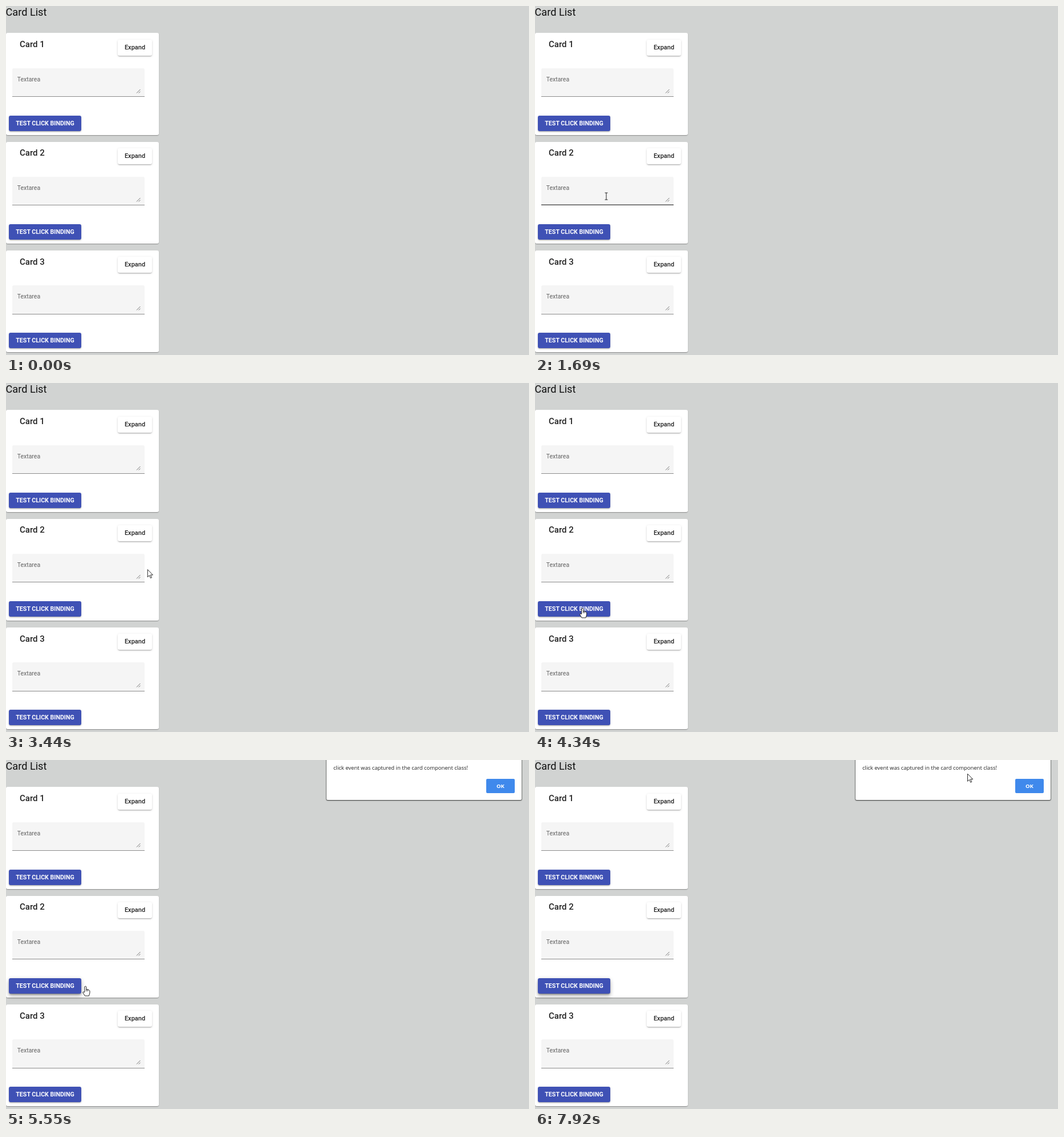
Recreate the animation shown at these times as an HTML page. Size 917 by 611 pixels, loop 7990 ms.

```html
<!DOCTYPE html>
<html lang="en">
<head>
<meta charset="utf-8">
<title>Card List</title>
<style>
  html, body { margin: 0; width: 100%; height: 100%; overflow: hidden; }
  body { position: relative; background: #d1d3d2; font-family: Roboto, sans-serif; color: rgba(0,0,0,.87); }
  body *, svg { position: absolute; white-space: nowrap; box-sizing: border-box; }
  h1, h2 { margin: 0; }
  h1 { left: -.6px; top: 0; font: 400 18.2px/21px Roboto, sans-serif; color: #111; }
  .card { left: 0; width: 268px; height: 178.3px; background: #fff; border-radius: 3px;
    box-shadow: 0 1.5px 1px -1px rgba(0,0,0,.2), 0 1px 1px rgba(0,0,0,.14), 0 1px 2px rgba(0,0,0,.12); }
  h2 { left: 24px; top: 9.95px; font: 500 15px/20px Roboto, sans-serif; }
  .button { border-radius: 3px; text-align: center;
    box-shadow: 0 2px 1px -1.5px rgba(0,0,0,.2), 0 1.5px 1.5px rgba(0,0,0,.14), 0 1px 4px rgba(0,0,0,.12); }
  .expand { left: 196px; top: 11.7px; width: 60px; height: 28px; font: 500 11px/27px Roboto, sans-serif; }
  .test { left: 5px; top: 144.4px; width: 127px; height: 27px; background: #3f51b5; color: #fff;
    font: 700 10.65px/27px Roboto, sans-serif; }
  .test span { left: 0; right: 0; }
  .lift { inset: 0; border-radius: 3px; opacity: 0;
    box-shadow: 0 4px 4px -2px rgba(0,0,0,.2), 0 6px 7px 1px rgba(0,0,0,.14), 0 2px 10px 1px rgba(0,0,0,.12); }
  .clip { inset: 0; border-radius: 3px; overflow: hidden; }
  .ripple { left: 78px; top: 13px; border-radius: 50%; background: #fff; opacity: 0; transform: translate(-50%, -50%); }
  .field { left: 11.4px; top: 61.5px; width: 232px; height: 50.4px; background: #f5f5f5;
    border-radius: 3px 3px 0 0; font-size: 10.5px; line-height: 20px; color: rgba(0,0,0,.6); }
  .field span { left: 8.3px; top: 9.8px; }
  .field svg { left: 217px; top: 35px; }
  .line, .hover { left: 0; right: 0; bottom: 0; height: 1px; background: #8c8c8c; }
  .hover { height: 2px; background: #222; opacity: 0; }
  #dialog { left: 562px; top: -20px; width: 342px; height: 90px; background: #fff; border-radius: 0 0 2px 2px;
    box-shadow: 0 0 1px 1px rgba(0,0,0,.32), 0 1px 2px rgba(0,0,0,.6); font-family: "Open Sans", sans-serif; }
  #dialog span { left: 12px; top: 24px; font-size: 9.48px; line-height: 20px; color: #222; }
  #ok { left: 280px; top: 53px; width: 50px; height: 25px; border-radius: 2px; background: #3f89ec; color: #fff;
    font-size: 9.6px; font-weight: 700; line-height: 25px; text-align: center; }
  #cursor { left: 0; top: 0; overflow: visible; }
</style>
</head>
<body>
<h1>Card List</h1>
<div id="dialog"><span>click event was captured in the card component class!</span><div id="ok">OK</div></div>
<svg id="cursor" width="1" height="1" stroke="#111" stroke-width=".9" stroke-linejoin="round">
  <path id="arrow" fill="#fff" d="M0 0V13.2L3 10.2L5.2 15L7.2 14.1L5.1 9.5H9.2Z"/>
  <path id="hand" fill="#fff" d="M-1.5 10.5V1Q0 -1 1.5 1V5.5Q5.4 5 7.6 8V12L6 17H-1L-4.6 11Q-4.5 9 -1.5 10.5M1.5 5V9M4 6V9"/>
  <path id="beam" d="M-2.5 -6H2.5M0 -6V6M-2.5 6H2.5"/>
</svg>
<script>
const LOOP = 7990, ENTER = 180, PRESS = 4850, ALERT = 5230;
const $ = s => document.querySelector(s);

$('h1').insertAdjacentHTML('afterend', [0, 1, 2].map(i => `
  <div class="card" id="card${i + 1}" style="top:${47.3 + 190.2 * i}px">
    <h2>Card ${i + 1}</h2>
    <div class="button expand">Expand</div>
    <div class="field"><span>Textarea</span>
      <svg width="9" height="9" stroke="#666" stroke-width=".9"><path d="M1 8.5L7.5 2M4.7 8.5L7.5 5.7"/></svg>
      <div class="line"></div><div class="hover"></div></div>
    <div class="button test"><div class="lift"></div><div class="clip"><div class="ripple"></div></div>
      <span>TEST CLICK BINDING</span></div>
  </div>`).join(''));

// Turning points of the pointer: time, x, y
const turns = [
  [ENTER, 707, 559], [890, 218, 294], [1300, 214, 218], [2030, 56, 426], [2400, 259, 368],
  [2920, 257, 323], [3300, 257, 323], [4340, 83, 394], [5300, 83, 394], [5550, 139, 396],
  [6490, 622, 47], [6750, 594, 46], [LOOP, 760, 24]
];

const clamp = v => Math.max(0, Math.min(1, v));
const easeOut = p => 1 - (1 - clamp(p)) ** 3;
const inside = ([x, y], l, t, r, b) => x >= l && x <= r && y >= t && y <= b;
const inField = t => t < PRESS && inside(pointAt(t), 11, 299, 244, 349);

const slope = (i, axis) => turns[i + 1] && turns[i]
  ? (turns[i + 1][axis] - turns[i][axis]) / (turns[i + 1][0] - turns[i][0]) : 0;

// Velocity at a turn: zero where the direction reverses, so the curve never overshoots
function velocity(i, axis) {
  const a = slope(i - 1, axis), b = slope(i, axis);
  return a * b > 0 ? 2 * a * b / (a + b) : 0;
}

function pointAt(t) {
  const i = Math.max(0, turns.findLastIndex(turn => turn[0] <= t));
  const span = turns[i + 1][0] - turns[i][0], k = clamp((t - turns[i][0]) / span);
  const s = k * k * (3 - 2 * k);
  return [1, 2].map(axis => turns[i][axis] * (1 - s) + turns[i + 1][axis] * s
    + span * k * (1 - k) * ((1 - k) * velocity(i, axis) - k * velocity(i + 1, axis)));
}

function shapeAt(t, p) {
  if (t >= PRESS) return inside(p, 561, 0, 904, 71) ? 'arrow' : 'hand';
  if (inside(p, 5, 382, 132, 409) || inside(p, 196, 249, 256, 277)) return 'hand';
  return inside(p, 20, 312, 236, 342) ? 'beam' : 'arrow';
}

function draw(t) {
  const p = pointAt(t), shape = shapeAt(t, p);
  $('#cursor').style.transform = `translate(${p[0]}px, ${p[1]}px)`;
  for (const path of $('#cursor').children)
    path.style.display = t >= ENTER && path.id === shape ? '' : 'none';

  let since = 0;
  while (since < 600 && t - since > ENTER && inField(t - since)) since += 20;
  $('#card2 .hover').style.opacity = easeOut(since / 600);

  const age = t - PRESS, ripple = $('#card2 .ripple').style;
  $('#card2 .lift').style.opacity = 0.8 * easeOut(age / 280);
  ripple.width = ripple.height = 180 * easeOut(age / 340) + 'px';
  ripple.opacity = age < 0 ? 0 : 0.1 * clamp((ALERT - t) / 200);
  $('#dialog').style.display = t < ALERT ? 'none' : '';
}

const start = performance.now();
(function tick() {
  draw((performance.now() - start) % LOOP);
  requestAnimationFrame(tick);
})();
</script>
</body>
</html>
```
